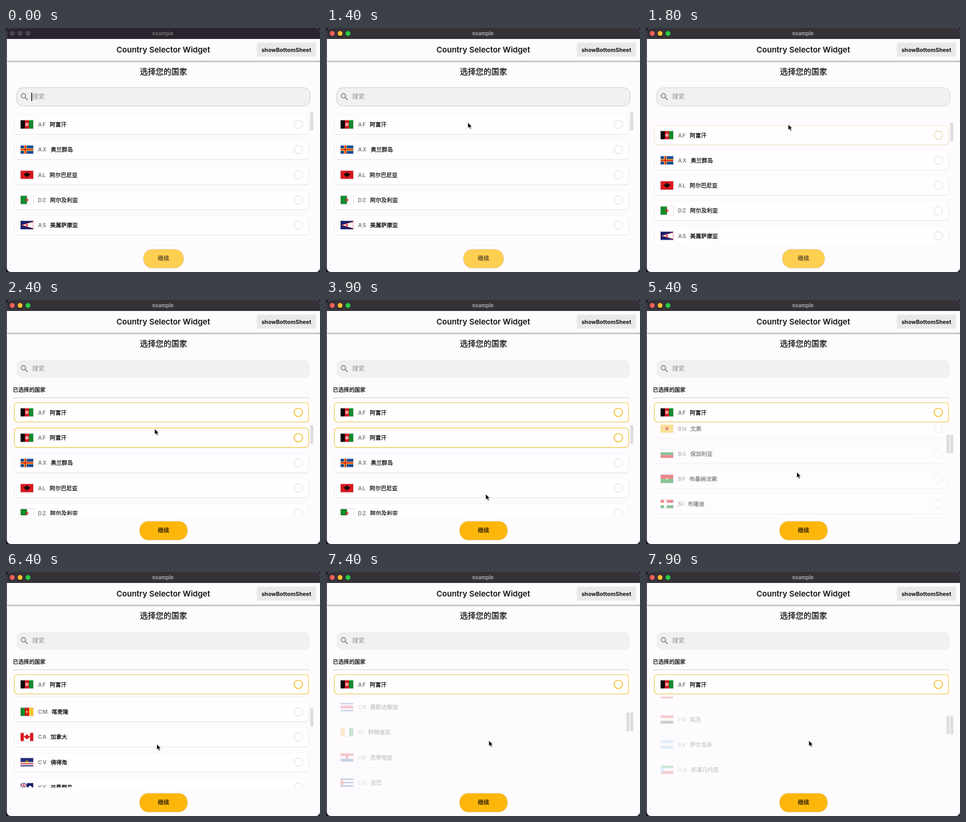
An HTML page for the animation above (8000 ms loop, 600 by 468 pixels).

```html
<!DOCTYPE html>
<html lang="zh">
<head>
<meta charset="utf-8">
<style>
html, body { margin: 0; width: 100%; height: 100%; overflow: hidden; background: #1b1230; }
svg { display: block; width: 600px; height: 468px; font-family: Inter, "Noto Sans CJK SC", "Noto Sans CJK", sans-serif; }
.cjk { font-family: "Noto Sans CJK SC", "Noto Sans CJK", sans-serif; font-weight: 500; }
.firm { fill: #111; stroke: #111; stroke-width: .3px; }
.code { font-size: 10.5px; font-weight: 700; letter-spacing: 1px; fill: #8b898c; }
.name { font-size: 10.6px; }
</style>
</head>
<body>
<svg viewBox="0 0 600 468">
  <defs>
    <clipPath id="win"><rect x="1.5" width="598.5" height="468" rx="8"/></clipPath>
    <clipPath id="view"><rect id="viewBox" x="2" y="158" width="598" height="255"/></clipPath>
    <clipPath id="flag"><rect width="24" height="16"/></clipPath>
    <linearGradient id="drop" x2="0" y2="1">
      <stop stop-color="#8f8d91"/><stop offset=".4" stop-color="#d6d4d8"/><stop offset="1" stop-color="#fefbff"/>
    </linearGradient>
  </defs>
  <g clip-path="url(#win)">
    <rect width="600" height="468" fill="#fefbff"/>
    <rect id="bar" width="600" height="21"/>
    <g id="lights"></g>
    <text id="title" x="300" y="13.7" font-size="10" font-weight="600" text-anchor="middle">example</text>
    <rect y="63" width="600" height="4" fill="url(#drop)"/>
    <text x="300.5" y="47" font-size="15" font-weight="600" text-anchor="middle" fill="#111">Country Selector Widget</text>
    <rect x="479.5" y="28" width="113" height="27" fill="#ebe8ec"/>
    <text x="535.7" y="46" font-size="10.6" font-weight="700" text-anchor="middle" fill="#111">showBottomSheet</text>
    <text class="cjk firm" x="301" y="89.3" font-size="15" text-anchor="middle">选择您的国家</text>

    <rect x="20.5" y="114.5" width="560.5" height="35" rx="12" fill="#f2f0f3"/>
    <rect id="focus" x="20.5" y="114.5" width="560.5" height="35" rx="12" fill="none" stroke="#c9c7ca"/>
    <g fill="none" stroke="#858386" stroke-width="1.8">
      <circle cx="33.3" cy="130" r="4.2"/><path d="M36.5 133.2L41.3 138"/>
    </g>
    <text class="cjk" x="50" y="136.4" font-size="12" fill="#98969a">搜索</text>
    <rect id="caret" x="48.4" y="124" width="1.6" height="16" fill="#111"/>

    <g clip-path="url(#view)"><g id="list"></g></g>
    <g id="picked">
      <text class="cjk firm" x="13" y="175.8" font-size="10.4">已选择的国家</text>
      <path d="M13 187.5H581" stroke="#cfcdd0"/>
      <g id="pickedRow"></g>
    </g>
    <rect id="thumb2" x="574" width="6" height="36" rx="2" fill="#dfdde0"/>
    <rect id="thumb" x="581.3" width="6" height="36" rx="2" fill="#dfdde0"/>

    <rect id="button" y="424.3" height="36.2" rx="17" stroke="#d9d4ca" stroke-width=".9"/>
    <text id="next" class="cjk" x="301" y="446" font-size="11" text-anchor="middle" stroke-width=".25">继续</text>
    <path id="mouse" d="M0 -1V10.2L2.6 7.9L4.5 12L6.5 11.1L4.7 7.2H8.2Z" fill="#000" stroke="#fff" stroke-width=".9"/>
  </g>
</svg>
<script>
const $ = id => document.getElementById(id);
const set = (id, attrs) => { for (const k in attrs) $(id).setAttribute(k, attrs[k]); };
const PITCH = 48.25, LOOP = 8000, STEP = 100;

const ink = {
  k: '#0a0a0a', r: '#d8181f', g: '#128a2c', b: '#124a9f', n: '#17206e',
  w: '#fff', y: '#f9c62f', s: '#63b4e8', o: '#f3a42a'
};

// code, name, stripe direction, stripes, then marks:
// . disc, @ ring, * star, ^ crest, + cross, < hoist triangle, > fly triangle, u canton
const countries = `
AF 阿富汗 v krg @w
AX 奥兰群岛 h b +y+r
AL 阿尔巴尼亚 h r ^k
DZ 阿尔及利亚 v gw @r
AS 美属萨摩亚 h n >w*r
AD 安道尔 v byr .o
AO 安哥拉 h rk *y
AI 安圭拉 h n u.w
AQ 南极洲 h s *w
AG 安提瓜和巴布达 h kbw *y
AR 阿根廷 h sws .y
AM 亚美尼亚 h rbo
AW 阿鲁巴岛 h ssssysys
AU 澳大利亞 h n u*w
AT 奥地利 h rwr
AZ 阿塞拜疆 h srg .w
BS 巴哈马 h sys <k
BH 巴林 v wrrr
BD 孟加拉国 h g .r
BB 巴巴多斯 v byb ^k
BY 白俄罗斯 h rrg
BE 比利时 v kyr
BZ 伯利兹 h rbbbbbr .w
BJ 贝宁 v gyr
BM 百慕大 h r u.w
BT 不丹 h yo ^w
BO 玻利维亚 h ryg
BA 波斯尼亚和黑塞哥维那 h b <y
BW 博茨瓦纳 h sskss
BR 巴西 h g ^y.b
IO 英属印度洋领地 h wbwbwb u
BN 文莱 h y .r
BG 保加利亚 h wgr
BF 布基纳法索 h rg *y
BI 布隆迪 h rg +w.w
KH 柬埔寨 h brrb .w
CM 喀麦隆 v gry *y
CA 加拿大 v rwwr ^r
CV 佛得角 h nnnnwrwn @y
KY 开曼群岛 h n u.w
CF 中非共和国 h bwgy
TD 乍得 v byr
CL 智利 h wr
CN 中国 h r *y
CX 圣诞岛 h gb .y
CC 科科斯群岛 h g .y
CO 哥伦比亚 h yybr
KM 科摩罗 h ywrb <g
CG 刚果 v gyr
CD 刚果民主共和国 h s *y
CK 库克群岛 h n u.w
CR 哥斯达黎加 h bwrrwb
CI 科特迪瓦 v owg
HR 克罗地亚 h rwb .r
CU 古巴 h bwbwb <r
CY 塞浦路斯 h w *o
CZ 捷克共和国 h wr <b
DK 丹麦 h r +w
DJ 吉布提 h sg <w
DM 多米尼加 h g +y.r
DO 多米尼加共和国 h br +w
EC 厄瓜多尔 h yybr .s
EG 埃及 h rwk *y
SV 萨尔瓦多 h sws *y
GQ 赤道几内亚 h gwr <s
ER 厄立特里亚 h gb <r
EE 爱沙尼亚 h bkw`.trim().split('\n').map(line => line.split(' '));

const crest = 'M12 2.2L13.3 4.4L14.6 4L14.2 7L16.2 5.6L18.2 6.6L17.2 8.4L14.4 11H12.5V13.6H11.5V11H9.6L6.8 8.4L5.8 6.6L7.8 5.6L9.8 7L9.4 4L10.7 4.4Z';
const star = 'M12 5L12.8 7.1H15L13.2 8.5L13.9 10.6L12 9.3L10.1 10.6L10.8 8.5L9 7.1H11.2Z';
const marks = {
  '.': c => `<circle cx="12" cy="8" r="3" fill="${c}"/>`,
  '@': c => `<circle cx="12" cy="8" r="2.5" fill="none" stroke="${c}" stroke-width="1"/><path d="${star}" fill="${c}" opacity=".6"/>`,
  '*': c => `<path d="${star}" fill="${c}"/>`,
  '^': c => `<path d="${crest}" fill="${c}"/>`,
  '<': c => `<path d="M0 0L8 8L0 16Z" fill="${c}"/>`,
  '>': c => `<path d="M24 1.5L2 8L24 14.5Z" fill="${c}" stroke="#dc1f26" stroke-width=".8"/>`
};

function flag(dir, stripes, extra = '') {
  const n = stripes.length;
  let art = [...stripes].map((c, i) => dir === 'h'
    ? `<rect y="${16 * i / n}" width="24" height="${16 / n + .1}" fill="${ink[c]}"/>`
    : `<rect x="${24 * i / n}" width="${24 / n + .1}" height="16" fill="${ink[c]}"/>`).join('');
  if (extra[0] === 'u') {
    art += '<path d="M0 0L12 8M12 0L0 8M6 0V8M0 4H12" stroke="#fff" stroke-width="1.8"/>' +
      '<path d="M6 0V8M0 4H12" stroke="#dc1f26"/>';
    if (extra[1]) art += `<g transform="translate(6 0)">${marks[extra[1]](ink[extra[2]])}</g>`;
    extra = '';
  }
  let crossWidth = 5;
  for (let i = 0; i < extra.length; i += 2) {
    const c = ink[extra[i + 1]];
    if (extra[i] === '+') {
      art += `<path d="M9 0V16M0 8H24" stroke="${c}" stroke-width="${crossWidth}"/>`;
      crossWidth -= 2.8;
    } else art += marks[extra[i]](c);
  }
  return `<rect x="27.5" y="-9" width="25" height="18" fill="#fff" stroke="#e4e2e5"/>` +
    `<g transform="translate(28 -8)" clip-path="url(#flag)">${art}</g>`;
}

const outline = (color, width, ring, ringWidth) =>
  `<rect x="16" y="-18.5" width="562.3" height="37" rx="6" fill="none" stroke="${color}" stroke-width="${width}"/>` +
  `<circle cx="558.6" r="8" fill="#fff" stroke="${ring}" stroke-width="${ringWidth}"/>`;

function row([code, name, dir, stripes, extra], y, hot) {
  return `<g transform="translate(0 ${y})">
    <rect x="15.5" y="-17" width="563.3" height="36.5" rx="6.5" fill="#dddbde"/>
    <rect x="16" y="-18.5" width="562.3" height="37" rx="6" fill="#fffdff"/>
    ${outline('#f3f1f4', .8, '#d6d4d7', 1)}
    ${hot ? `<g class="hot">${outline('#f5cb3c', 1.2, '#f4bb18', 1.5)}</g>` : ''}
    ${flag(dir, stripes, extra)}
    <text x="61" y="4"><tspan class="code">${code}</tspan><tspan class="cjk firm name" dx="6.8">${name}</tspan></text>
  </g>`;
}

$('list').innerHTML = countries.map((c, i) => row(c, i * PITCH, !i)).join('');
$('pickedRow').innerHTML = row(countries[0], 215.5, true);
const hot = document.querySelector('#list .hot');

const clamp = x => Math.max(0, Math.min(1, x));
const ease = x => x * x * (3 - 2 * x);
const mix = (a, b, p) => a + (b - a) * p;

// keys: [time, value] pairs
function track(keys, t, curve = x => x) {
  let i = 0;
  while (i < keys.length - 2 && t >= keys[i + 1][0]) i++;
  const [t0, a] = keys[i], [t1, b] = keys[i + 1];
  return mix(a, b, curve(clamp((t - t0) / (t1 - t0))));
}

const scrollKeys = [[4200, 0], [4700, 503], [5200, 1260], [5500, 1640], [5700, 1733], [6600, 1733], [7000, 2060], [7900, 2973]];
const fadeKeys = [[4300, 1], [4600, .5], [5400, .5], [5800, 1], [6600, 1], [6900, .25], [7900, .2]];
const barKeys = [[4200, 0], [4400, 1], [5900, 1], [6200, 0], [6600, 0], [6800, 1]];
const mouseX = [[800, 300], [1300, 271], [1700, 271], [2400, 284], [3000, 290], [3900, 305], [4300, 288], [6500, 288], [7000, 311]];
const mouseY = [[800, 225], [1300, 182], [1700, 182], [2400, 248], [3000, 290], [3900, 373], [4300, 331], [6500, 331], [7000, 324]];

function draw(t) {
  const active = t >= 800;
  set('bar', { fill: active ? '#343137' : '#29242d' });
  set('title', { fill: active ? '#b3b1b5' : '#77737b' });
  $('lights').innerHTML = ['#fe5f57', '#febc2e', '#28c840'].map((c, i) =>
    `<circle cx="${12 + 15 * i}" cy="10.4" r="4.6" fill="${active ? c : '#4b464f'}"/>`).join('');

  const p = ease(clamp((t - 1700) / 300));
  const scroll = track(scrollKeys, t);
  const top = mix(161, 240, p);
  set('viewBox', { y: top - 1, height: 414 - top });
  set('list', { transform: `translate(0 ${mix(185, 264.2, p) - scroll})`, opacity: track(fadeKeys, t) });
  hot.setAttribute('opacity', p);
  set('picked', { opacity: clamp(2 * p - 1) });
  set('focus', { opacity: 1 - p });
  set('caret', { opacity: t < 1700 && t % 1000 < 400 ? 1 : 0 });

  const y = top + scroll / 84;
  set('thumb', { y });
  set('thumb2', { y, opacity: track(barKeys, t) });

  const w = mix(77, 92, p), label = p > .5 ? '#1d1602' : '#574720';
  set('button', { x: 301 - w / 2, width: w, fill: p > .5 ? '#fdb70b' : '#ffcf51' });
  set('next', { fill: label, stroke: label });
  set('mouse', {
    transform: `translate(${track(mouseX, t, ease)} ${track(mouseY, t, ease)})`,
    opacity: active ? 1 : 0
  });
}

let last = -1;
function tick() {
  const t = Math.floor(performance.now() % LOOP / STEP) * STEP;
  if (t !== last) draw(last = t);
  requestAnimationFrame(tick);
}
tick();
</script>
</body>
</html>
```
